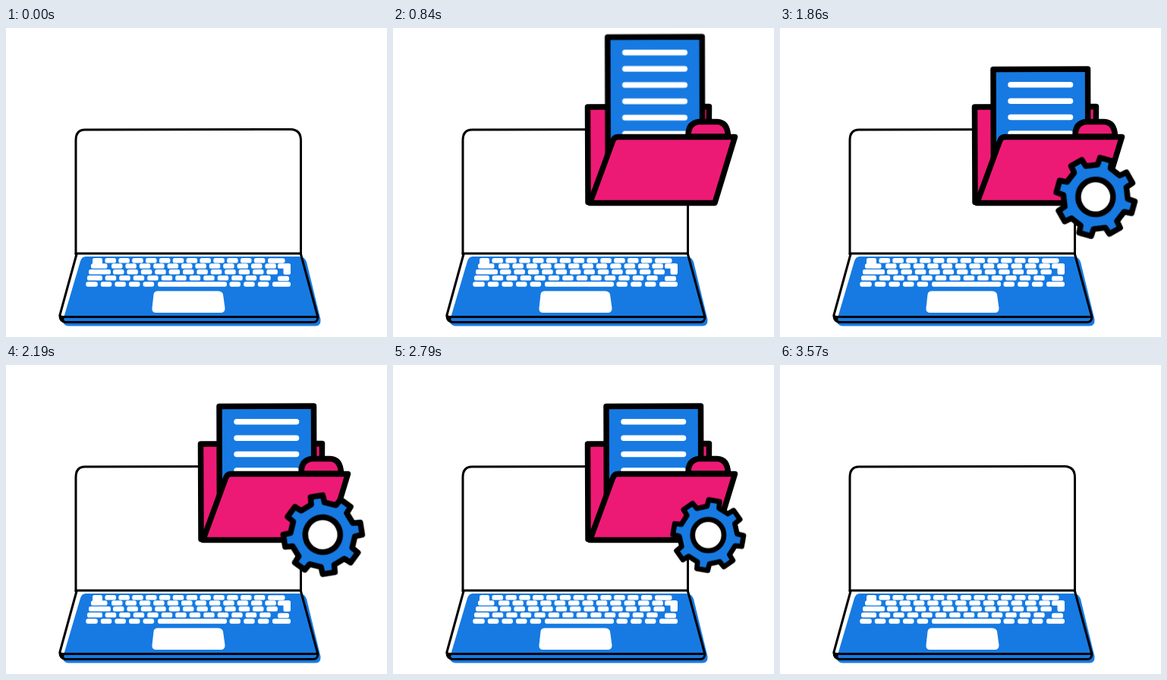
These frames come from a looping animation (502x407 px, 3600 ms). An HTML page:

```html
<!DOCTYPE html>
<html lang="en">
<head>
<meta charset="utf-8">
<title>Laptop, folder and gear</title>
<style>
  html, body { margin: 0; width: 100%; height: 100%; overflow: hidden; background: #fff; }
  svg { display: block; width: 100%; height: 100%; }

  .ink { stroke: #000; stroke-width: 7.5; stroke-linejoin: round; stroke-linecap: round; }
  .blue { fill: #167ae2; }
  .pink { fill: #ed1a75; }
  .white { fill: #fff; }
  .thin { fill: none; stroke-width: 3; }

  .leave, .grow, .paper, .gear, .spin { animation: 3600ms linear infinite; }
  .leave, .grow { transform-origin: 254px 233px; }
  .gear, .spin { transform-origin: 416.2px 223.5px; }
  .leave { animation-name: leave; }
  .grow { animation-name: grow; }
  .paper { animation-name: drop; }
  .gear { animation-name: pop; }
  .spin { animation-name: spin; }

  @keyframes grow {
    0%, 4.583% { transform: scale(0); animation-timing-function: cubic-bezier(.33, .36, .75, .88); }
    12.917%, 100% { transform: scale(1); }
  }
  @keyframes leave {
    0% { transform: scale(1); }
    92.639% { transform: scale(1); animation-timing-function: cubic-bezier(.25, .12, .67, .64); }
    99.028%, 100% { transform: scale(0); }
  }
  @keyframes drop {
    0%, 9.028% { transform: translate(9.6px, -240px); }
    26.444%, 100% { transform: none; }
  }
  @keyframes pop {
    0% { transform: scale(0); }
    34.444% { transform: scale(0); animation-timing-function: cubic-bezier(.33, .36, .75, .88); }
    41.528% { transform: scale(1); }
    76.25% { transform: scale(1); animation-timing-function: cubic-bezier(.25, .12, .67, .64); }
    84.583%, 100% { transform: scale(0); }
  }
  @keyframes spin {
    0%, 43.75% { transform: rotate(0deg); }
    73.611%, 100% { transform: rotate(360deg); }
  }
</style>
</head>
<body>
<svg viewBox="0 0 502 407">
  <g id="laptop">
    <path class="blue" d="M105 301H387Q394 302 396 308L414.500 384Q415 392.500 408 392.500H82Q75 392 75 385L98 307Q100 301 105 301Z"/>
    <path class="ink thin" d="M92 298V148Q92 134 104 134L340 133.500H375Q388.500 134 388.500 148V298"/>
    <path class="ink thin" d="M92 297H388.500M93 298L71 378Q71 380.500 74 380.500H409"/>
    <path class="ink thin" d="M388.500 298L411 381Q410.500 387.500 405 387.500H78Q71 386 71 379"/>
    <path d="M70 378L78 381Q74 384 79 388.500L75 387.500Q69 384 70 378Z"/>
    <g id="keys" class="white"></g>
    <path class="white" d="M200 346.500H279Q285 346.500 286 351L288.500 369Q288.500 375 283 375H198Q192 375 192.500 369L194.500 351Q195 346.500 200 346.500Z"/>
  </g>

  <g class="leave">
    <path class="grow ink pink" d="M257 229.500L256.500 104L416.500 103.500L415.500 229.500Z"/>
    <g class="paper">
      <path class="ink blue" d="M281 54.500L405.500 54L406 227H281.500Z"/>
      <path stroke="#fff" stroke-width="7.500" stroke-linecap="round"
        d="M304 75H382.500M304 96.400H382.500M304 117.800H382.500M304 139.200H382.500M304 160.600H382.500M304 182H382.500"
        transform="translate(0 -.2)"/>
    </g>
    <g class="grow ink pink">
      <path d="M389 143Q388.500 125 403 123.500H427Q441 124 441.500 143Z"/>
      <path d="M296 143.500H450.500L424 230.500H259.500L289.500 149Q291.500 143.500 296 143.500Z"/>
    </g>
  </g>

  <g class="gear">
    <g class="spin">
      <g class="ink" transform="translate(415.200 224)">
        <path id="cog" class="blue"/>
        <circle class="white" r="23"/>
      </g>
    </g>
  </g>
</svg>
<script>
  const keys = document.getElementById('keys');

  function addKey(x, y, width, height = 6.5) {
    const key = document.createElementNS('http://www.w3.org/2000/svg', 'rect');
    Object.entries({ x, y, width, height, rx: 2.6 })
      .forEach(([name, value]) => key.setAttribute(name, value));
    keys.append(key);
  }

  function addRow(x, y, count, pitch) {
    for (let i = 0; i < count; i++) addKey(x + i * pitch, y, 14.5);
  }

  addRow(130.5, 303, 12, 17.85);
  addRow(139, 310.3, 12, 18.4);
  addRow(141, 318, 12, 18.4);
  addRow(130.7, 326, 12, 18.5);
  addRow(124.8, 334.2, 4, 18.6);
  addRow(294.5, 334.2, 3, 18.7);

  // Wide and tall keys at the row ends
  [
    [114, 303, 13, 12], [345, 303.2, 22.5],
    [112, 310.3, 21.5], [358, 310.3, 17], [365.5, 310.3, 9.5, 14.5],
    [109, 318, 29],
    [107, 326, 20], [358, 326.8, 15],
    [105.3, 334.2, 15.5], [200, 334.2, 91], [351, 334.2, 24]
  ].forEach(box => addKey(...box));

  function cogPath(teeth, phase) {
    const corners = [[-12, 42.5], [-9, 52], [9, 52], [12, 42.5]];
    const points = [];
    for (let i = 0; i < teeth; i++) {
      for (const [offset, radius] of corners) {
        const angle = (phase + i * 360 / teeth + offset) * Math.PI / 180;
        points.push(`${(radius * Math.cos(angle)).toFixed(2)} ${(radius * Math.sin(angle)).toFixed(2)}`);
      }
    }
    return `M${points.join('L')}Z`;
  }

  document.getElementById('cog').setAttribute('d', cogPath(8, 9.75));
</script>
</body>
</html>
```
